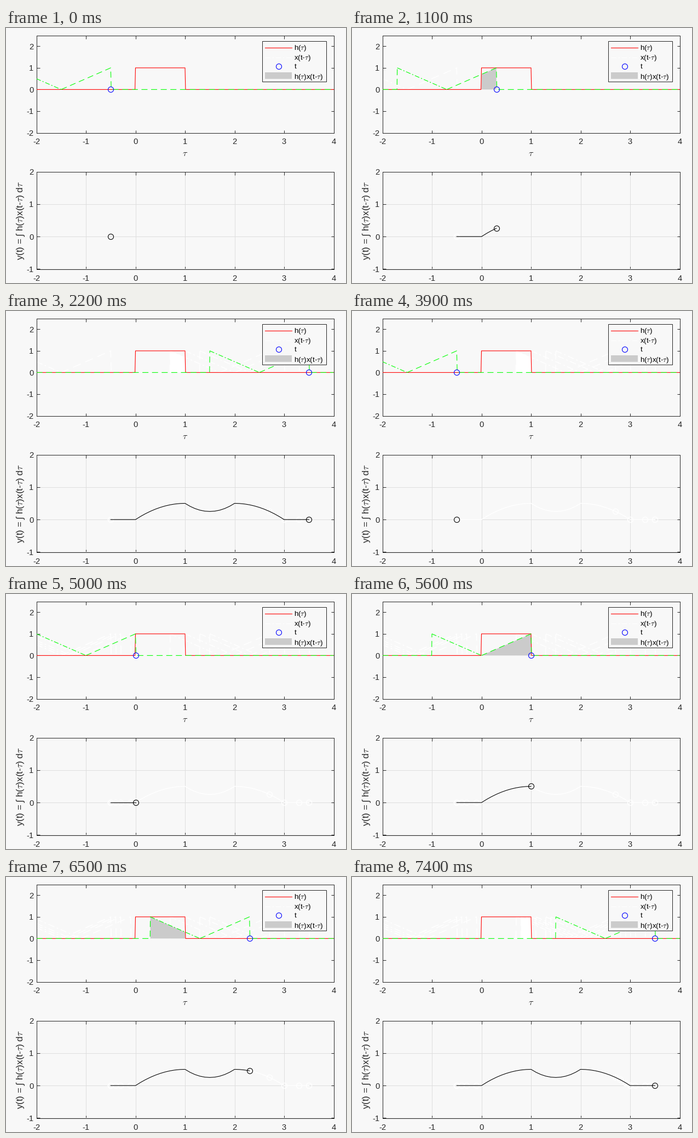
These frames come from a looping animation (621 by 466 pixels, 7800 ms). A matplotlib script:

```python
import matplotlib.pyplot as plt
import numpy as np
from matplotlib.animation import FuncAnimation
from matplotlib.patches import Rectangle

W, H, DPI = 621, 466, 72          # at 72 dpi one point is one pixel
BG, INK, GREY = "#f8f8f8", "#262626", "#cbcbcb"
DASH, DASHDOT = (0, (10, 6)), (0, (8, 3, 2, 3))
FRAMES, RESTART = 78, 39

plt.rcParams.update({
    "font.family": "Liberation Sans",
    "mathtext.fontset": "cm",
    "axes.edgecolor": INK,
    "axes.linewidth": 1,
})

fig = plt.figure(figsize=(W / DPI, H / DPI), dpi=DPI, facecolor=BG)


def make_axes(top, bottom, ylim, yticks):
    left, right = 55.5, 598.5
    ax = fig.add_axes([left / W, 1 - bottom / H,
                       (right - left) / W, (bottom - top) / H], facecolor=BG)
    ax.set(xlim=(-2, 4), ylim=ylim, xticks=range(-2, 5), yticks=yticks)
    ax.set_xticklabels([str(v) for v in range(-2, 5)])
    ax.set_yticklabels([str(v) for v in yticks])
    ax.tick_params(direction="in", top=True, right=True, length=5.5, width=1,
                   color=INK, labelcolor=INK, labelsize=14.7)
    ax.tick_params(axis="x", pad=10)
    ax.tick_params(axis="y", pad=5)
    return ax


def ring(ax, color, x=0, y=0, width=1.1, z=6):
    return ax.plot([x], [y], "o", ms=10, mfc="none", mec=color, mew=width,
                   zorder=z, clip_on=False)[0]


def area(u):
    """Integral of x(s) = |s - 1| from 0 to u, zero outside [0, 2]."""
    u = np.clip(u, 0, 2)
    return np.where(u < 1, u - u**2 / 2, 0.5 + (u - 1)**2 / 2)


def conv(t):
    return area(t) - area(t - 1)


def product(t):
    """Outline of h(tau) x(t - tau)."""
    lo, hi = max(0, t - 2), min(1, t)
    if hi <= lo:
        return np.array([[0, 0]])
    mid = np.clip(t - 1, lo, hi)
    tau = np.array([lo, mid, hi])
    return np.vstack([[lo, 0], np.c_[tau, abs(tau - t + 1)], [hi, 0]])


class Signal:
    """The flipped, shifted x(t - tau)."""

    def __init__(self, color, z, width=1.1):
        self.parts = [top.plot([], [], color=color, lw=width, ls=ls, zorder=z)[0]
                      for ls in (DASH, DASHDOT, DASH)]

    def move(self, t, base=True):
        flat, fall, rise = self.parts
        a = t - 2
        start = -2 if base else a
        if a > -2:
            flat.set_data([start, a - 0.005, a], [0, 0, 1])
        else:
            flat.set_data([], [])
        if t - 1 > -2:
            s = max(a, -2)
            fall.set_data([s, t - 1], [t - 1 - s, 0])
        end = 4 if base else t + 0.01
        rise.set_data([t - 1, t, t + 0.01, end], [0, 1, 0, 0])

    def show(self, on):
        for p in self.parts:
            p.set_visible(on)


class Ghost:
    """White trace that stays behind after time t has passed."""

    def __init__(self, t, birth):
        self.t, self.birth = t, birth
        self.signal = Signal("white", 2, 1.5)
        self.signal.move(t, base=False)
        self.fill = top.fill(*product(t).T, color="white", lw=0, zorder=1)[0]
        self.ring = ring(low, "white", t, conv(t), 1.5, 0.6)

    def show(self, n, t):
        on = n >= self.birth
        self.signal.show(on)
        self.ring.set_visible(on)
        wiped = self.birth <= RESTART and n >= RESTART and t >= 0
        self.fill.set_visible(on and not wiped)


def time_at(n):
    if n < RESTART:
        u = np.interp(n - 9, [0, 1, 6, 8, 10, 12, 13],
                      [0, 5, 19, 25, 32, 38, 40])
    else:
        u = np.interp(n - 46, [0, 2, 8, 16, 19, 22, 24, 28],
                      [0, 2, 12, 24, 28, 33, 35, 40])
    return np.rint(u) / 10 - 0.5


# Axes and fixed parts
top = make_axes(13.5, 191.5, (-2, 2.5), range(-2, 3))
low = make_axes(262.5, 440.5, (-1, 2), range(-1, 3))
low.grid(color="#dedede", lw=1)
low.set_axisbelow(True)

top.plot([-2, -0.01, 0, 1, 1.01, 4], [0, 0, 1, 1, 0, 0],
         color="red", lw=1.1, zorder=4)

over = fig.add_axes([0, 0, 1, 1], zorder=10)
over.set(xlim=(0, W), ylim=(H, 0))
over.axis("off")

over.text(327.5, 233.5, r"$\tau$", size=16, color=INK, ha="center")
over.text(31, 351.5, "y(t) = \u222b h($\\tau$)x(t-$\\tau$) d$\\tau$", size=17,
          color=INK, rotation=90, rotation_mode="anchor",
          ha="center", va="baseline")

# Legend
over.add_patch(Rectangle((467.5, 23.5), 117, 74, fc=BG, ec=INK, lw=1, zorder=1))
over.plot([473, 522], [35.5, 35.5], color="red", lw=1.1)
over.plot([473, 522], [53.5, 53.5], color="white", lw=1.2, ls=DASHDOT)
ring(over, "blue", 497.5, 69.7)
over.add_patch(Rectangle((473, 81), 49, 12, fc=GREY, lw=0, zorder=2))
labels = [r"h($\tau$)", r"x(t-$\tau$)", "t", r"h($\tau$)x(t-$\tau$)"]
for y, label in zip((40, 58, 74.5, 92.5), labels):
    over.text(526.5, y, label, size=13.4, color="black", zorder=7)

# Moving parts
signal = Signal("lime", 5)
fill = top.fill([0], [0], color=GREY, lw=0, zorder=3)[0]
dot = ring(top, "blue")
trace, = low.plot([], [], color="black", lw=1.1, zorder=5)
end = ring(low, "black")
grid_t = np.linspace(-0.5, 3.5, 41)
old_trace, = low.plot(grid_t, conv(grid_t), color="white", lw=1.5, zorder=0.6)

ghosts = []
for n in range(1, FRAMES):
    before = time_at(n - 1)
    if before != time_at(n) and not -0.05 < before < 2.65:
        ghosts.append(Ghost(before, n))


def update(n):
    t = time_at(n)
    signal.move(t)
    fill.set_xy(product(t))
    dot.set_data([t], [0])
    past = grid_t[grid_t < t + 0.01]
    trace.set_data(past, conv(past))
    end.set_data([t], [conv(t)])
    old_trace.set_visible(n >= RESTART)
    for g in ghosts:
        g.show(n, t)
    return []


anim = FuncAnimation(fig, update, frames=FRAMES, interval=100,
                     init_func=lambda: update(0), repeat=True, repeat_delay=0)
plt.show()
```
